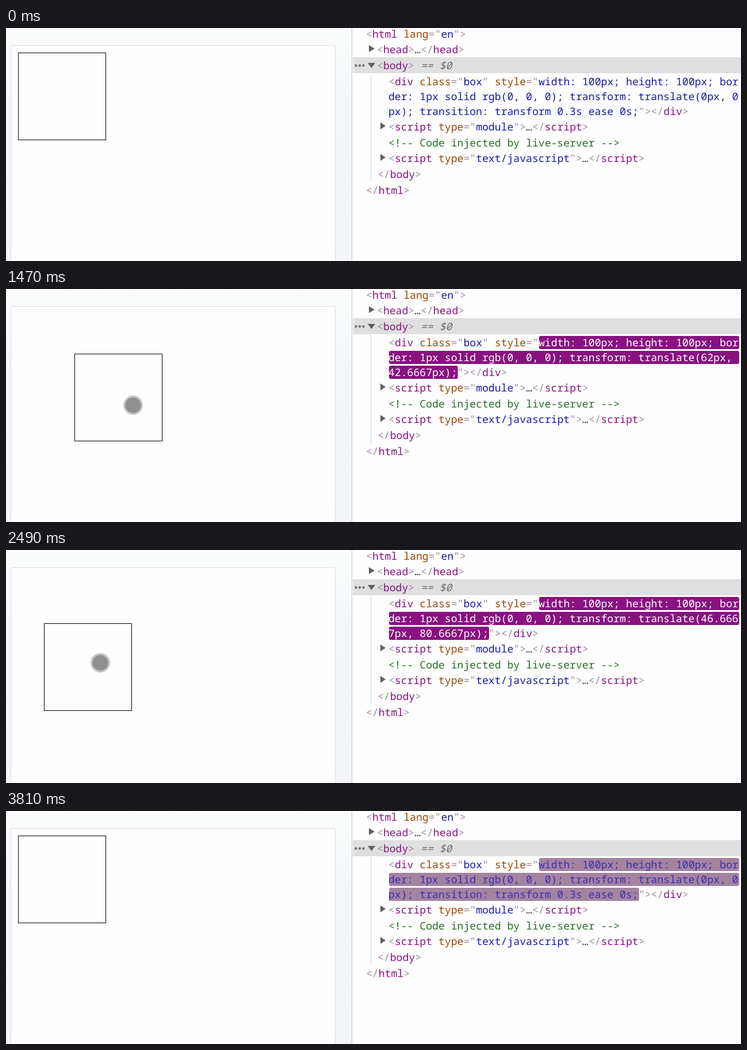
An HTML page that plays this animation: 1278 px wide and 407 px high, repeating every 3.87 s.

```html
<!DOCTYPE html>
<html lang="en">
<head>
<meta charset="utf-8">
<title>Dragging a box</title>
<style>
  html, body { margin: 0; width: 100%; height: 100%; overflow: hidden; background: #fefefe; }
  svg { display: block; }
  text { white-space: pre; text-rendering: geometricPrecision; }
  .code { font: 18.12px "Noto Sans Mono", "DejaVu Sans Mono", monospace; }
  .tip { font: 18px "Noto Sans", "Open Sans", sans-serif; }
  .p { fill: #9f899d; }
  .t { fill: #881280; }
  .a { fill: #994500; }
  .v { fill: #1a1aa6; }
  .c { fill: #236e25; }
  .d { fill: #303942; }
  .g { fill: #6e6e6e; font-style: italic; }
  .content { fill: #6fa8dc; fill-opacity: .66; }
  .border { fill: #ffe599; fill-opacity: .66; fill-rule: evenodd; }
  .margin { fill: #f6b26b; fill-opacity: .66; fill-rule: evenodd; }
</style>
</head>
<body>
<svg id="stage" width="1278" height="407" viewBox="0 0 1278 407">
  <defs>
    <linearGradient id="bg" x2="0" y2="1">
      <stop offset="0" stop-color="#fafcfb"/>
      <stop offset=".3" stop-color="#f4f6fa"/>
      <stop offset="1" stop-color="#f3f5f9"/>
    </linearGradient>
    <filter id="shadow" x="-20%" y="-40%" width="140%" height="190%">
      <feDropShadow dx="0" dy="2" stdDeviation="4" flood-opacity=".3"/>
    </filter>
    <g id="bubble" fill="#fff" filter="url(#shadow)">
      <path d="M16 1L26 -9L36 1Z"/>
      <rect width="193" height="45" rx="3"/>
    </g>
  </defs>

  <rect width="601" height="407" fill="url(#bg)"/>
  <rect x="8.5" y="30.5" width="564" height="400" rx="2" fill="#fefefe" stroke="#dadce0"/>
  <rect id="box" x="21.5" y="43.5" width="152" height="152" fill="none" stroke="#000"/>

  <g id="divHover">
    <path class="margin" d="M174 43H561V196H174Z"/>
    <path class="border" d="M21 43H174V196H21ZM22 44V195H173V44Z"/>
    <path class="content" d="M22 44H173V195H22Z"/>
    <use href="#bubble" x="21" y="207"/>
    <text class="tip t" x="33" y="237" font-weight="700">div<tspan class="v">.box</tspan></text>
    <text class="tip" x="117" y="237" fill="#5f6368">102 × 102</text>
  </g>

  <g id="bodyHover">
    <path class="margin" d="M9 31H573V209H9ZM21 43V196H561V43Z"/>
    <path class="content" d="M21 43H561V196H21Z"/>
    <use href="#bubble" x="14" y="220"/>
    <text class="tip t" x="26" y="249" font-weight="700">body</text>
    <text class="tip" x="87" y="249" fill="#5f6368">359.33 × 102</text>
  </g>

  <g id="touch">
    <circle r="17" fill="#000" fill-opacity=".22"/>
    <circle r="13.6" fill="#8f8f8f"/>
  </g>

  <rect x="601" width="677" height="407" fill="#fefefe"/>
  <rect x="601" width="1" height="407" fill="#cacaca"/>
  <rect x="603" y="51" width="675" height="28" fill="#dfdfdf"/>
  <rect x="634" y="80" width="1" height="189" fill="#b9dafb"/>
  <path stroke="#6e6e6e" stroke-width="4.4" stroke-linecap="round" d="M608.5 65.5h0M615 65.5h0M621.5 65.5h0"/>
  <path fill="#606060" d="M631 30l10 6l-10 6ZM629 61h13l-6.5 9ZM651 165l9 6l-9 6ZM651 220l9 6l-9 6Z"/>
  <g id="code" class="code"></g>
  <path id="arrow" fill="#fff" stroke="#000" stroke-width="1.2" d="M0 0V20L4.6 15.8L7.6 23L11 21.5L8 14.6H14.3Z"/>
</svg>

<script>
const LOOP = 3870, STEP = 30;
const ADV = 18.12 * 0.6, LEFT = 665, COLS = 56, LEAD = 24;
const DRAG = 990, RELEASE = 3026, RETURN = 300, FADE = 790;
const $ = id => document.getElementById(id);

function make(tag, attrs) {
  const el = document.createElementNS('http://www.w3.org/2000/svg', tag);
  for (const k in attrs) el.setAttribute(k, attrs[k]);
  $('code').append(el);
  return el;
}

// Tokens are split by "|"; the first letter of each is its colour class.
function row(x, y, tokens) {
  const line = make('text', { x, y });
  for (const token of tokens.split('|')) {
    const span = make('tspan', { class: token[0] });
    span.textContent = token.slice(1);
    line.append(span);
  }
  return line;
}

row(626, 17, 'p<|thtml|a lang|p="|ven|p">');
row(645, 44, 'p<|thead|p>|d…|p</|thead|p>');
row(645, 72, 'p<|tbody|p>|g == $0');
row(LEFT, 100, 'p<|tdiv|a class|p="|vbox|p"|a style|p="');
row(LEFT, 179, 'p<|tscript|a type|p="|vmodule|p">|d…|p</|tscript|p>');
row(LEFT, 207, 'c<!-- Code injected by live-server -->');
row(LEFT, 234, 'p<|tscript|a type|p="|vtext/javascript|p">|d…|p</|tscript|p>');
row(646, 262, 'p</|tbody|p>');
row(626, 290, 'p</|thtml|p>');

const tail = row(LEFT, 152, 'p"></|tdiv|p>');
const lines = [100, 126, 152].map((y, i) => {
  const x = i ? LEFT : LEFT + LEAD * ADV;
  return {
    mark: make('rect', { x: x + 1, y: y - 18, height: 23, rx: 3 }),
    text: make('text', { x, y })
  };
});

// Turning points of the drag: time, x, y
const drag = [
  [960, 0, 0], [1110, 23, 13], [1440, 93, 64], [1470, 98, 70], [1530, 104, 78],
  [1620, 132, 96], [1740, 200, 72], [1830, 196, 36], [2010, 112, 15], [2130, 73, 33],
  [2160, 85, 60], [2310, 119, 122], [2460, 70, 121], [2490, 45, 85], [2600, 57, 42],
  [2700, 142, 92], [2880, 216, 98], [2970, 219, 143]
];

const mix = (a, b, u) => a.map((v, i) => v + (b[i] - v) * u);
const progress = (t, from, to) => Math.min(1, Math.max(0, (t - from) / (to - from)));

// Smooth curve through timed points
function along(path, t) {
  const last = path.length - 1;
  if (t <= path[0][0]) return path[0].slice(1);
  if (t >= path[last][0]) return path[last].slice(1);
  const i = path.findIndex(p => p[0] > t) - 1;
  const a = path[i], b = path[i + 1];
  const before = path[Math.max(i - 1, 0)], after = path[Math.min(i + 2, last)];
  const span = b[0] - a[0], u = (t - a[0]) / span;
  return [1, 2].map(k => {
    const m = (b[k] - before[k]) / (b[0] - before[0]) * span;
    const n = (after[k] - a[k]) / (after[0] - a[0]) * span;
    const d = b[k] - a[k];
    return a[k] + u * (m + u * (3 * d - 2 * m - n + u * (m + n - 2 * d)));
  });
}

// CSS "ease": cubic-bezier(.25, .1, .25, 1)
function ease(x) {
  if (x >= 1) return 1;
  const curve = (s, p, q) => 3 * (1 - s) * (1 - s) * s * p + 3 * (1 - s) * s * s * q + s ** 3;
  let lo = 0, hi = 1;
  for (let i = 0; i < 20; i++) {
    const mid = (lo + hi) / 2;
    if (curve(mid, 0.25, 0.25) < x) lo = mid; else hi = mid;
  }
  return curve(lo, 0.1, 1);
}

const dragAt = t => along(drag, t).map(Math.round);

function boxAt(t) {
  const k = 1 - ease(progress(t, RELEASE, RELEASE + RETURN));
  return dragAt(t).map(v => v * k);
}

// The inspector shows the position one step late.
function styleAt(t) {
  const held = t >= DRAG && t < RELEASE;
  const [x, y] = held ? dragAt(t - STEP).map(v => +(v / 1.5).toPrecision(6)) : [0, 0];
  return `width: 100px; height: 100px; border: 1px solid rgb(0, 0, 0); transform: translate(${x}px, ${y}px);` +
    (held ? '' : ' transition: transform 0.3s ease 0s;');
}

// Glide in, settle on the grip, lead the box by one step, then swipe out.
function touchAt(t) {
  if (t < 450 || t >= 3300) return null;
  if (t < 600) {
    const left = 1 - progress(t, 450, 600);
    return [142 + 424 * left, 133 + 44 * left ** 3];
  }
  const [x, y] = dragAt(t + STEP);
  const grip = mix([142, 133], [121, 129], progress(t, 600, 760));
  return [x + grip[0] + Math.max(0, t - 3150) * 55 / STEP, y + grip[1]];
}

function arrowAt(t) {
  if (t >= 30 && t < 450) return mix([1200, 126], [608, 178], progress(t, 30, 420));
  if (t >= 3300 && t < 3810) return mix([604, 258], [1206, 126], progress(t, 3300, 3780));
  return null;
}

const show = (el, on) => { el.style.display = on ? '' : 'none'; };

function place(el, pos) {
  show(el, pos);
  if (pos) el.setAttribute('transform', `translate(${pos[0]} ${pos[1]})`);
}

function drawStyle(t) {
  const css = styleAt(t), first = COLS - LEAD;
  const parts = [css.slice(0, first), css.slice(first, first + COLS), css.slice(first + COLS)];
  const flash = t >= DRAG, u = progress(t, RELEASE, RELEASE + FADE);
  const ink = flash ? `rgb(${mix([255, 255, 255], [58, 44, 176], u)})` : '#1a1aa6';
  const back = flash ? `rgb(${mix([136, 18, 128], [164, 132, 160], u)})` : 'none';
  lines.forEach(({ mark, text }, i) => {
    text.textContent = parts[i];
    text.setAttribute('fill', ink);
    mark.setAttribute('fill', back);
    mark.setAttribute('width', parts[i].length * ADV);
  });
  tail.setAttribute('x', LEFT + parts[2].length * ADV);
}

function draw(ms) {
  const t = Math.floor(ms % LOOP / STEP) * STEP;
  place($('box'), boxAt(t));
  place($('touch'), touchAt(t));
  place($('arrow'), arrowAt(t));
  show($('divHover'), t >= 60 && t < 390);
  show($('bodyHover'), t >= 3300 && t < 3420);
  drawStyle(t);
}

const start = performance.now();
function tick() {
  draw(performance.now() - start);
  requestAnimationFrame(tick);
}
tick();
</script>
</body>
</html>
```
